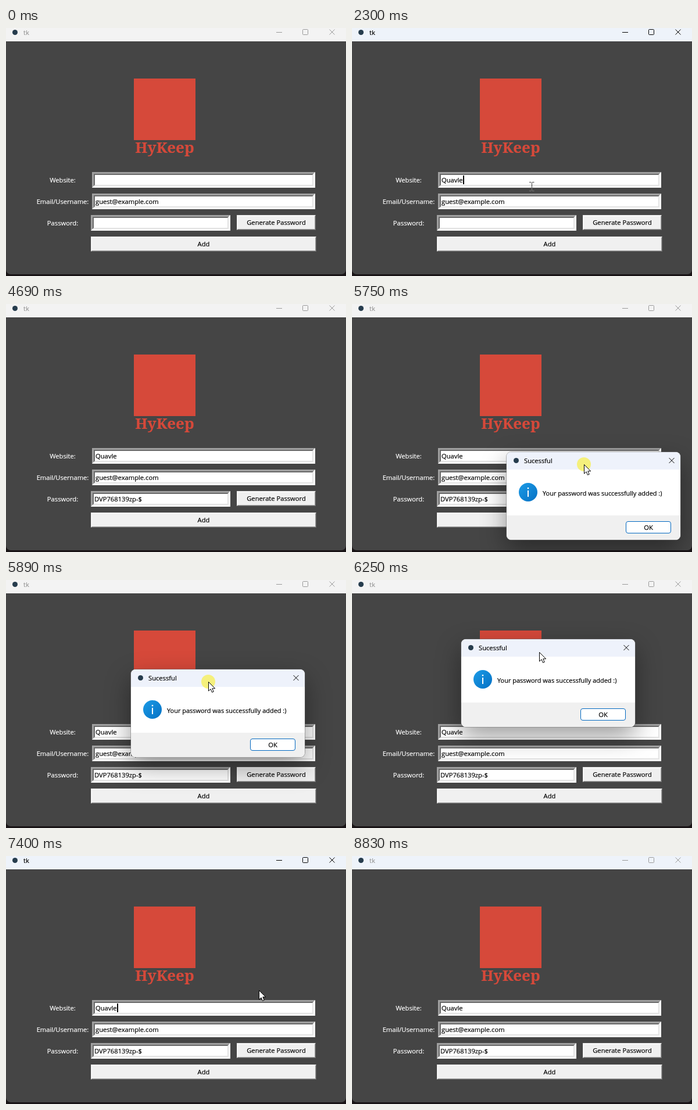
Animation of 585x427 px, one loop 8.9 s. Source, as an HTML page:

```html
<!DOCTYPE html>
<html lang="en">
<head>
<meta charset="utf-8">
<title>Password manager</title>
<style>
  html, body { margin: 0; width: 100%; height: 100%; overflow: hidden; background: #191416; }
  #stage { position: relative; width: 585px; height: 427px; overflow: hidden; color: #000;
    font: 11.2px "Open Sans", "Noto Sans", sans-serif; -webkit-text-stroke: .2px currentColor;
    white-space: pre; cursor: default; }
  #stage *, #stage *::before { box-sizing: border-box; position: absolute; }
  #window { left: 0; top: -20px; width: 585px; height: 444px; border-radius: 0 0 8px 8px; background: #454545; }
  #bar { left: 0; top: 0; width: 585px; height: 23px; background: #f3f3f3; color: #999; }
  #bar.tinted { background: #eef3fa; }
  #bar.active { color: #000; }
  svg { left: 0; top: 0; overflow: visible; fill: none; stroke: currentColor; }
  .icon { width: 9px; height: 9px; border-radius: 50%; background: #263c4d; }
  .text { line-height: 17px; }
  #badge { left: 220px; top: 87px; width: 106px; height: 106px; background: #d6493a; }
  #brand { left: 173px; top: 188px; width: 200px; text-align: center; color: #d6493a;
    font: 900 26px/34px "Noto Serif", serif; }
  .label { left: 38px; width: 119px; line-height: 17px; text-align: center; color: #fff; }
  .field { height: 27px; background: #fff; border: 3px solid; border-color: #a0a0a0 #fff #fff #a0a0a0; }
  .field::before { content: ""; inset: 0; border: 2px solid; border-color: #696969 #e3e3e3 #e3e3e3 #696969; }
  .field .text { left: 3px; top: 2px; }
  #stage #site { position: static; }
  #stage #caret { position: relative; display: none; vertical-align: top; top: 1px;
    width: 2px; height: 15px; margin-right: -2px; background: #000; }
  .button { height: 26px; line-height: 24px; text-align: center; background: #f0f0f0;
    border: 1px solid; border-color: #e3e3e3 #696969 #696969 #e3e3e3; }
  .button::before { content: ""; inset: 0; border: 1px solid; border-color: #fff #a0a0a0 #a0a0a0 #fff; }
  .button.pressed { border-color: #696969 #fff #fff #696969; }
  #dialog { left: 0; top: 0; width: 299px; height: 151px; border-radius: 8px; background: #fff;
    box-shadow: 0 0 0 1px rgba(110,110,110,.5), 0 16px 44px rgba(0,0,0,.4); }
  #head { left: 0; top: 0; width: 299px; height: 30px; border-radius: 8px 8px 0 0; background: #eef2fb; }
  #foot { left: 0; bottom: 0; width: 299px; height: 42px; border-radius: 0 0 8px 8px; background: #f0f0f0; }
  #info { left: 21px; top: 53px; width: 32px; height: 32px; border-radius: 50%; color: #fff;
    background: linear-gradient(135deg, #1b9be6, #0671c4); }
  #message { left: 62px; top: 62px; font-size: 10.95px; }
  #ok { left: 205px; top: 119px; width: 78px; height: 21px; line-height: 20px; text-align: center;
    background: #fff; border: 1px solid #0067c0; border-radius: 4px; }
  #ok.hover { background: #e0eef9; }
  #pointer { left: 0; top: 0; }
  #glow { left: -12px; top: -12px; width: 24px; height: 24px; border-radius: 50%; background: rgba(248,240,70,.7); }
  #beam { color: #bbb; mix-blend-mode: difference; }
</style>
</head>
<body>
<div id="stage">
  <div id="window"></div>
  <div id="bar">
    <i class="icon" style="left:11px;top:3px"></i>
    <span class="text" style="left:30px;top:-1px">tk</span>
    <svg width="585" height="23"><path d="M465 7.5h10M556.5 2.5l9 9m0-9l-9 9"/><rect x="510.5" y="2.5" width="9" height="9" rx="1"/></svg>
  </div>
  <div id="badge"></div>
  <div id="brand">HyKeep</div>

  <div class="label" style="top:253px">Website:</div>
  <div class="label" style="top:290px">Email/Username:</div>
  <div class="label" style="top:327px">Password:</div>
  <div class="field" style="left:148px;top:248px;width:384px">
    <div class="text"><span id="site"></span><i id="caret"></i></div>
  </div>
  <div class="field" style="left:148px;top:285px;width:384px"><div class="text">guest@example.com</div></div>
  <div class="field" style="left:146px;top:322px;width:240px"><div class="text" id="password"></div></div>
  <div class="button" id="generate" style="left:397px;top:322px;width:136px">Generate Password</div>
  <div class="button" id="add" style="left:146px;top:359px;width:388px">Add</div>

  <div id="dialog">
    <div id="head">
      <i class="icon" style="left:12px;top:10px"></i>
      <span class="text" style="left:30px;top:6px">Sucessful</span>
      <svg width="299" height="30"><path d="M279.5 10l9 9m0-9l-9 9"/></svg>
    </div>
    <div id="info"><svg width="32" height="32"><path d="M16 13v11" stroke-width="2"/><path d="M16 8v2.4" stroke-width="2.4"/></svg></div>
    <div id="message" class="text">Your password was successfully added :)</div>
    <div id="foot"></div>
    <div id="ok">OK</div>
  </div>

  <svg id="beam" width="1" height="1"><path d="M-4 -7.5h3.5M1 -7.5h3.5M.5 -7v14M-4 7.5h3.5M1 7.5h3.5"/></svg>
  <div id="pointer">
    <div id="glow"></div>
    <svg id="arrow" width="1" height="1"><path d="M.5 .5v15.6l3.6-3.3 2.4 5.6 2.7-1.2-2.4-5.4h4.9z" fill="#fff" stroke="#000"/></svg>
  </div>
</div>
<script>
const LOOP = 8900;
const SITE = "Quavle";

// Moments of the story, in ms
const at = {
  focus: 500, typing: 1240, typed: 1930, generate: 3140, add: 4150, blur: 4300,
  drag: 5620, drop: 6100, confirm: 6980, refocus: 7130, closing: 7200, closed: 7400, leave: 8830
};
const PRESS = 130, BLINK = 900, CARET_ON = 600;

// Places the pointer visits
const OUTSIDE = [560, 435], DIALOG_FROM = [340, 400], DIALOG_TO = [188, 102], GRIP = [133, 21];
const MOVES = [
  { from: 70, to: 640, place: [309, 273] },
  { from: 2570, to: at.generate, place: [423, 346] },
  { from: 3600, to: 4010, place: [410, 373] },
  { from: at.blur, to: 4650, place: OUTSIDE },
  { from: at.drag, to: at.drop, place: [322, 124] },
  { from: 6250, to: at.confirm, place: [435, 231] },
  { from: 7730, to: 8430, place: [590, 440] }
];

const el = Object.fromEntries([...document.querySelectorAll("[id]")].map(e => [e.id, e]));
const fields = [...document.querySelectorAll(".field")];
const within = (t, from, to) => t >= from && t < to;
const progress = (t, from, to) => Math.min(1, Math.max(0, (t - from) / (to - from)));
const easeOut = (k, power) => 1 - (1 - k) ** power;
const mix = (a, b, k) => a.map((v, i) => Math.round(v + (b[i] - v) * k));
const show = (node, on) => { node.style.display = on ? "block" : "none"; };
const place = (node, [x, y], scale = 1) => { node.style.transform = `translate(${x}px,${y}px) scale(${scale})`; };

const isActive = t => within(t, at.focus, at.blur) || within(t, at.refocus, at.leave);
const isPressed = (t, click) => within(t, click, click + PRESS);
const dialogAt = t => mix(DIALOG_FROM, DIALOG_TO, easeOut(progress(t, at.drag, at.drop), 2.1));

function pointerAt(t) {
  if (within(t, at.drag, at.drop)) return dialogAt(t).map((v, i) => v + GRIP[i]);
  return MOVES.reduce((p, m) => mix(p, m.place, easeOut(progress(t, m.from, m.to), 2)), OUTSIDE);
}

function overField([x, y]) {
  return fields.some(f => within(x, f.offsetLeft, f.offsetLeft + f.offsetWidth)
    && within(y, f.offsetTop, f.offsetTop + f.offsetHeight));
}

function lettersTyped(t) {
  const last = SITE.length - 1;
  const keyTime = i => at.typing + (at.typed - at.typing) * easeOut(i / last, 1.4);
  return [...SITE].filter((_, i) => t >= keyTime(i)).join("");
}

function render(t) {
  el.bar.classList.toggle("active", isActive(t));
  el.bar.classList.toggle("tinted", isActive(t - 75));

  const focused = t < at.refocus ? at.focus : at.refocus;
  const caretOn = isActive(t) && (t - focused) % BLINK < CARET_ON;
  el.site.textContent = lettersTyped(t);
  el.caret.style.display = caretOn ? "inline-block" : "none";
  el.password.textContent = t >= at.generate + PRESS / 2 ? "DVP768139zp-$" : "";
  el.generate.classList.toggle("pressed", isPressed(t, at.generate));
  el.add.classList.toggle("pressed", isPressed(t, at.add));

  const fade = progress(t, at.closing, at.closed);
  const closing = t >= at.closing;
  const open = within(t, at.drag, at.closed);
  show(el.dialog, open);
  el.dialog.style.opacity = closing ? .77 * (1 - fade) : 1;
  place(el.dialog, dialogAt(t), closing ? .988 - .06 * fade : 1);
  el.ok.classList.toggle("hover", t >= at.confirm - PRESS);

  const pointer = pointerAt(t);
  const typing = !open && overField(pointer);
  const clicking = within(t, at.drag, at.drop)
    || [at.focus, at.generate, at.add, at.confirm].some(click => isPressed(t, click));
  show(el.beam, typing);
  show(el.arrow, !typing);
  show(el.glow, clicking);
  place(el.beam, pointer);
  place(el.pointer, pointer);
}

const start = performance.now();
function tick() {
  render((performance.now() - start) % LOOP);
  requestAnimationFrame(tick);
}
render(0);
requestAnimationFrame(tick);
</script>
</body>
</html>
```
